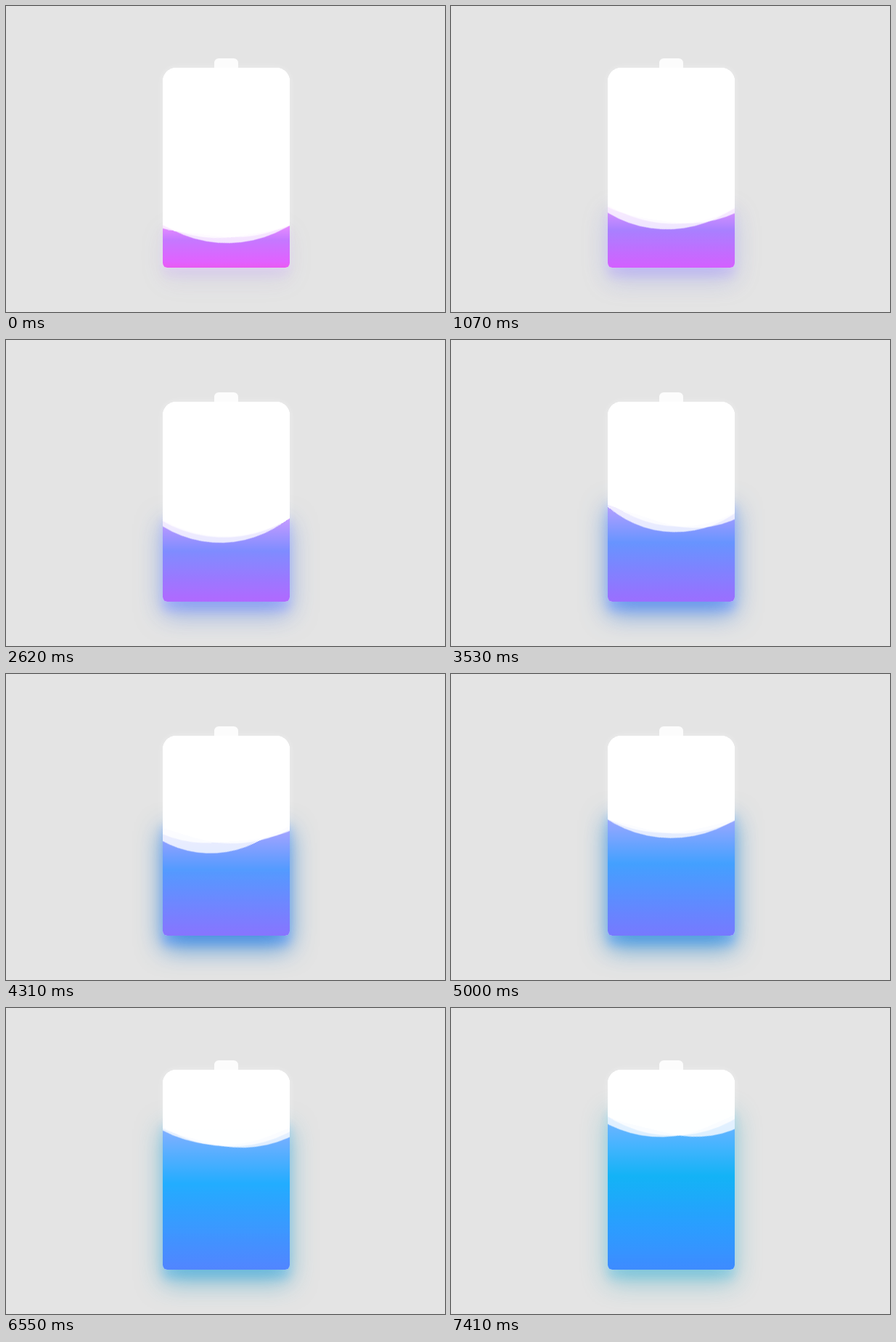
An HTML page that plays this animation: 605x421 px, repeating every 7490 ms.

```html
<!DOCTYPE html>
<html lang="en">
<head>
<meta charset="utf-8">
<title>Charging battery</title>
<style>
html, body { margin: 0; width: 100%; height: 100%; overflow: hidden; background: #e4e4e4; }
div { position: absolute; }
.cap {
  left: 287px; top: 72px; width: 33px; height: 12.5px;
  border-radius: 6.25px 6.25px 0 0;
  background: rgba(255, 255, 255, .88);
}
.battery, .window {
  left: 216px; top: 85px; width: 175px; height: 275px;
  border-radius: 18.75px 18.75px 6.25px 6.25px;
}
.battery { background: #fff; box-shadow: 0 0 6.25px 2.5px rgba(255, 255, 255, .22); }
.window { overflow: hidden; }
.liquid {
  left: 0; right: 0; bottom: 0; top: 80%;
  border-radius: 0 0 6.25px 6.25px;
  background: linear-gradient(to bottom, #7abcff 0%, #00bcd4 44%, #2196f3 100%);
  box-shadow: 0 17.5px 35px rgba(33, 150, 243, 0), 0 12.5px 12.5px rgba(9, 188, 215, .08);
  filter: hue-rotate(90deg);
  animation: charge 10s linear infinite paused;
}
.wave {
  left: 50%; bottom: 31.25px; width: 375px; height: 375px;
  background: rgba(255, 255, 255, .8);
  border-radius: 45% 47% 44% 42%;
  transform: translate(-50%, 0) rotate(0deg);
  animation: rise 10s linear infinite paused;
}
.wave:nth-child(2) {
  border-radius: 38% 46% 43% 47%;
  transform: translate(-50%, 0) rotate(-135deg);
}
.wave:nth-child(3) {
  border-radius: 42% 46% 37% 40%;
  transform: translate(-50%, 0) rotate(135deg);
}
@keyframes charge {
  50% { box-shadow: 0 17.5px 35px rgba(0, 150, 136, .83), 0 12.5px 12.5px rgba(9, 188, 215, .4); }
  95% {
    top: 5%;
    filter: hue-rotate(0deg);
    border-radius: 0 0 6.25px 6.25px;
    box-shadow: 0 17.5px 35px rgba(4, 188, 213, .2), 0 12.5px 12.5px rgba(9, 188, 215, .08);
  }
  100% { top: 0; filter: hue-rotate(0deg); }
}
@keyframes rise {
  100% { transform: translate(-50%, -200px) rotate(720deg); }
}
</style>
</head>
<body>
<div class="cap"></div>
<div class="battery"><div class="liquid"></div></div>
<div class="window">
  <div class="wave"></div>
  <div class="wave"></div>
  <div class="wave"></div>
</div>
<script>
// The loop shows only part of the ten second charge, then cuts back.
const LOOP = 7490, START = 605, RATE = 1.005;
const animations = document.getAnimations();
const begin = performance.now();

function draw() {
  const time = (performance.now() - begin) % LOOP;
  for (const a of animations) a.currentTime = START + time * RATE;
  requestAnimationFrame(draw);
}
draw();
</script>
</body>
</html>
```
